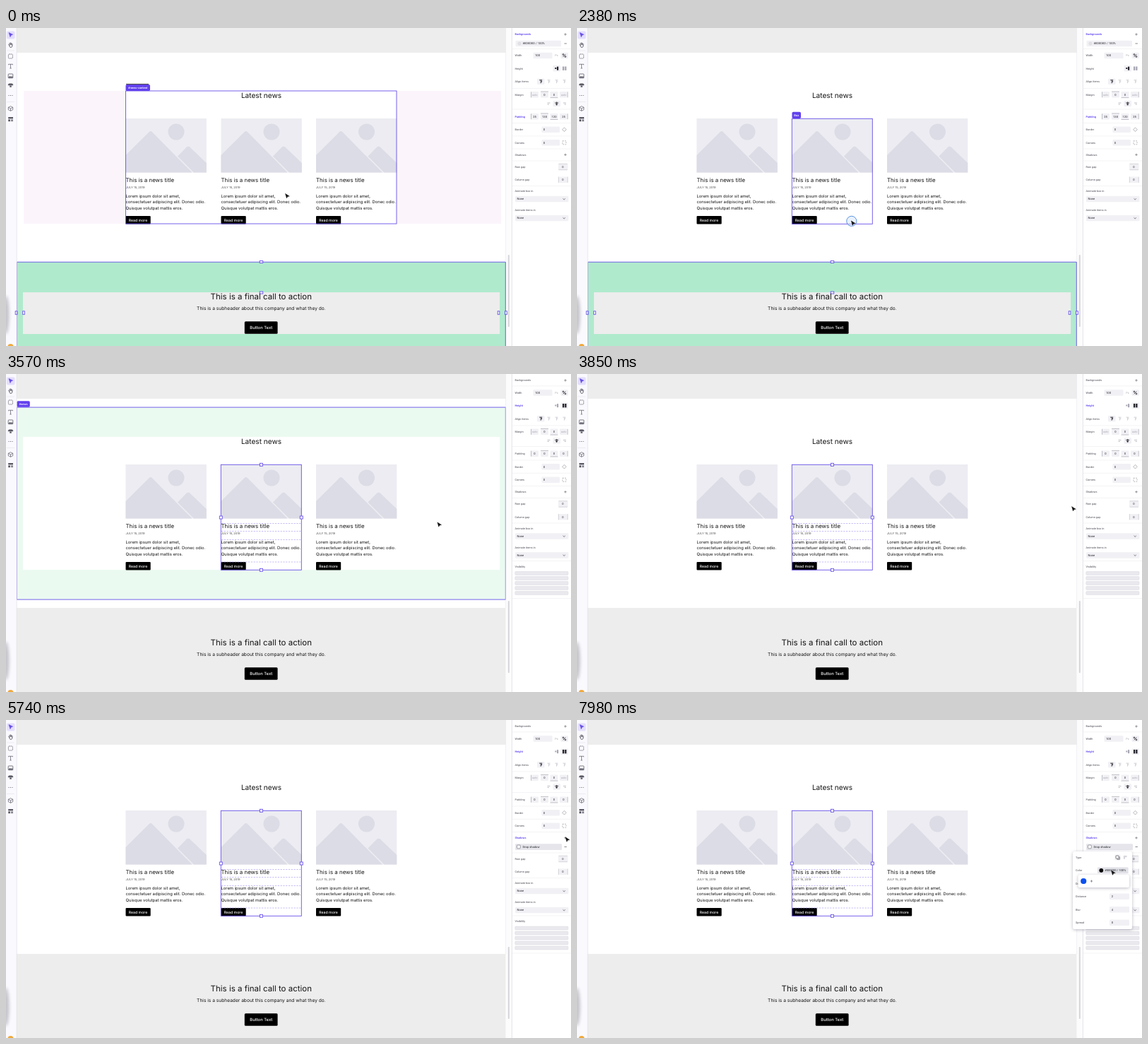
Write an HTML page that moves like this. It is 800 px wide and 450 px high and loops after 8000 ms.

```html
<!DOCTYPE html>
<html lang="en">
<head>
<meta charset="utf-8">
<title>Page builder</title>
<style>
  html, body { margin: 0; width: 100%; height: 100%; overflow: hidden; background: #fff; }
  svg { display: block; width: 100vw; height: 100vh; }
  text { font-family: Inter, "Open Sans", sans-serif; fill: #141414; text-rendering: geometricPrecision; }
  .ui text { font-family: Roboto, Inter, sans-serif; font-size: 3.9px; fill: #4c4c57; }
  .ui text.on { fill: #5a3df0; font-weight: 500; }
  .ui text.dim { fill: #a9a9b4; }
  .ui text.val { fill: #24242c; font-size: 4.1px; }
  text.tag { font-family: Roboto, Inter, sans-serif; font-size: 4.1px; font-weight: 500; fill: #fff; }
  .pop { filter: drop-shadow(0 1px 2px rgba(30, 30, 60, .3)); }
</style>
</head>
<body>
<svg id="stage" viewBox="0 0 800 450" preserveAspectRatio="none"></svg>
<script>
const LOOP = 8000;
const PURPLE = '#6750e8', FIELD = '#f1f1f5', BAND = '#ededed';

// Drawing helpers
const rect = (x, y, w, h, fill, more = '') =>
  `<rect x="${x}" y="${y}" width="${w}" height="${h}" fill="${fill}" ${more}/>`;
const text = (x, y, s, more = '') => `<text x="${x}" y="${y}" ${more}>${s}</text>`;
const path = (d, stroke, width = .7, fill = 'none') =>
  `<path d="${d}" stroke="${stroke}" stroke-width="${width}" fill="${fill}"/>`;
const size = (n, more = '') => `font-size="${n}" ${more}`;
const mid = 'text-anchor="middle"';
const outline = (x, y, w, h) => rect(x, y, w, h, 'none', `stroke="${PURPLE}" stroke-width=".9"`);
const handle = (x, y, w = 4, h = 4) =>
  rect(x - w / 2, y - h / 2, w, h, '#fff', `stroke="${PURPLE}" stroke-width=".9"`);
const tag = (x, y, w, h, s) =>
  rect(x, y, w, h, '#6140ee', 'rx="1.8"') + text(x + w / 2, y + h / 2 + 1.4, s, `class="tag" ${mid}`);
const group = (id, body) => `<g id="${id}">${body}</g>`;

// Page
function card(x) {
  const lines = ['Lorem ipsum dolor sit amet,', 'consectetuer adipiscing elit. Donec odio.',
    'Quisque volutpat mattis eros.'];
  return `<g transform="translate(${x} 0)">`
    + rect(0, 128, 114.3, 76.5, '#ececf2')
    + '<circle cx="71.5" cy="147" r="11.5" fill="#dcdce6"/>'
    + path('M0 180 L33 147.2 Q35.3 145 37.6 147.2 L94 204.5 H0 Z', 'none', 0, '#dcdce6')
    + path('M73.5 181.500 L86.5 168.3 Q88.5 166.5 90.5 168.3 L114.3 191 V204.5 H96.5 Z', 'none', 0, '#dcdce6')
    + text(0, 218.4, 'This is a news title', size(7.9))
    + text(0, 227, 'JULY 15, 2019', size(4.1, 'fill-opacity=".75"'))
    + lines.map((s, i) => text(0, 240 + i * 8.4, s, size(5.87))).join('')
    + rect(0, 265.9, 35.2, 11.7, '#000', 'rx="1"')
    + text(17.5, 273.6, 'Read more', size(5.2, `${mid} font-weight="500" style="fill:#fff"`))
    + '</g>';
}
const cards = [169.5, 304.5, 439].map(card).join('');

const ctaText = text(361.3, 383.6, 'This is a final call to action', size(11.5, mid))
  + text(361.4, 398.5, 'This is a subheader about this company and what they do.', size(6.63, mid))
  + rect(337.8, 415.2, 46.8, 17.6, '#000', 'rx="1.5"')
  + text(361.3, 426, 'Button Text', size(5.85, `${mid} font-weight="500" style="fill:#fff"`));

const ctaPick = rect(15, 331, 692.5, 119, '#b0eacd') + rect(24, 374, 675, 59, BAND)
  + path('M15.3 450 V331.2 H707.3 V450', PURPLE, .9)
  + handle(361.5, 331, 4.5, 3) + handle(361.5, 374.5, 4.5, 3)
  + [14.5, 25, 697.5, 708].map(x => handle(x, 403, 2.6, 4.6)).join('');

const cardPick = outline(304.3, 128.3, 114, 149)
  + path('M305 211.5 H418 M305 222.5 H418 M305 234.5 H418 M305 266 H418', '#9d8ff2', .6)
    .replace('/>', ' stroke-dasharray="2.2 1.6"/>')
  + handle(361.4, 128.3) + handle(361.4, 277.3) + handle(304.3, 203) + handle(418.3, 203);

// Tool strip
function tools() {
  const ink = '#5a5a65';
  return rect(0, 0, 15, 450, '#faf9fd') + path('M15.2 0 V450', '#e2e2e8', .8)
    + rect(1, 4.5, 11.5, 11, '#e4defc', 'rx="2"')
    + path('M4 6.6 L9.6 9.2 L7.2 10.2 L6 12.7 Z', PURPLE, .6, PURPLE)
    + path('M1 32 H12 M1 104.5 H12', '#e2e2e8', .6)
    + path('M4.5 24.5 L3.5 23 M5 25 V21 M6.3 24 V20.5 M7.6 24 V21 M8.9 24.5 V22 M4.5 24.5 Q5 27.6 7 27.6 Q9.3 27.2 8.9 24', ink, .9)
    + rect(3.4, 37, 6, 6, 'none', `stroke="${ink}" stroke-width=".8" stroke-dasharray="1.4 .7" rx="1"`)
    + path('M3.5 52.3 V51.3 H9.5 V52.3 M6.5 51.3 V57 M5.3 57 H7.7', ink, .7)
    + rect(3.2, 65, 6.6, 5.8, 'none', `stroke="${ink}" stroke-width=".8" rx=".8"`)
    + path('M3.5 70.3 L5.6 68 L7 69.4 L8.2 68.2 L9.6 70.3 Z', ink, .4, ink)
    + path('M3 81 Q3 78.7 5 78.7 H8 Q10 78.7 10 81 Z M5.5 81.8 H7.5 V83.5 H5.5 Z', ink, .5, ink)
    + [4, 6.5, 9].map(x => `<circle cx="${x}" cy="95.5" r=".6" fill="${ink}"/>`).join('')
    + path('M6.5 110.7 L9.7 112.3 V115.7 L6.5 117.3 L3.3 115.7 V112.3 Z M3.3 112.3 L6.5 114 L9.7 112.3 M6.5 114 V117.3', ink)
    + rect(3.2, 126, 6.8, 2.4, ink) + rect(3.2, 129.4, 2.8, 2.8, ink) + rect(7, 129.4, 3, 2.8, '#888892')
    + '<ellipse cx="0" cy="406" rx="4.5" ry="27" fill="#a8a8b2" opacity=".65" style="filter:blur(2px)"/>'
    + '<circle cx="6.5" cy="451" r="4" fill="#f0a93c"/>';
}

// Side panel
const plus = (x, y) => path(`M${x - 1.7} ${y} h3.4 M${x} ${y - 1.7} v3.4`, '#555560', .6);
const minus = y => path(`M790.5 ${y} h3.4`, '#555560', .7);
const label = (y, s, on) => text(720.5, y + 1.4, s, on ? 'class="on"' : '');
const value = (x, y, s, dim) => text(x, y + 1.4, s, `${mid} class="${dim ? 'dim' : 'val'}"`);
const field = (x, y, w, h = 8.5) => rect(x, y - h / 2, w, h, FIELD, 'rx="1.2"');
const rule = y => path(`M717 ${y} H800`, '#ececf0', .6);
const select = y => field(721, y, 75.5) + text(723.5, y + 1.4, 'None', 'class="val"')
  + path(`M788.5 ${y - .7} l1.7 1.6 l1.7 -1.6`, '#44444e', .7);

function alignIcon(x, y, on) {
  return path(`M${x - 2} ${y - 2} h4 M${x} ${y - 1.5} v4 M${x + 1.3} ${y - 1} v2`, on ? '#22222a' : '#b4b4be', on ? .9 : .6);
}
function sides(y, vals) {
  return [748.5, 762.5, 776, 789.5].map((x, i) => {
    const edge = ['M743.5 -4 V4', 'M757 -4.3 H768', 'M770.5 4.3 H781.5', 'M795.3 -4 V4'][i];
    return field(x - 5.5, y, 11) + `<g transform="translate(0 ${y})">${path(edge, '#9a9aa6', .6)}</g>`
      + value(x, y, vals[i], vals[i] === 'auto');
  }).join('');
}

function panel({ bg, shadow }) {
  let y = bg ? 12.5 : 0;
  let s = label(9, 'Backgrounds', bg) + plus(792, 9);
  if (bg) s += field(721.5, 22, 64.5)
    + '<circle cx="727" cy="22" r="2.2" fill="#e4e4e6" stroke="#d0d0d6" stroke-width=".4"/>'
    + text(731.5, 23.4, '#EDEDED / 100%', 'class="val"') + minus(22);
  s += rule(17 + y)
    + label(26.5 + y, 'Width') + field(746.5, 26.5 + y, 27) + value(752.5, 26.5 + y, '100')
    + value(779.5, 26.5 + y, 'Px', true) + field(785.5, 26.5 + y, 10.5)
    + path(`M788.7 ${28.3 + y} l3.6 -3.6`, '#22222a', .8)
    + [[789, 25], [792, 28]].map(p => `<circle cx="${p[0]}" cy="${p[1] + y}" r=".9" fill="none" stroke="#22222a" stroke-width=".8"/>`).join('')
    + label(44.7 + y, 'Height', !bg);
  const dark = on => on ? '#22222a' : '#a6a6b2';
  s += field(bg ? 774.5 : 785.5, 44.7 + y, 10.5)
    + rect(777.3, 43.5 + y, 2, 2, dark(bg)) + rect(780, 42.2 + y, 2.2, 5, dark(bg))
    + rect(788, 42 + y, 2.3, 5.4, dark(!bg)) + rect(791.2, 42 + y, 2.3, 5.4, dark(!bg))
    + label(63.2 + y, 'Align items') + field(752, 63.2 + y, 10.5)
    + [757.2, 768.5, 779.5, 790.5].map((x, i) => alignIcon(x, 63.2 + y, !i)).join('')
    + rule(73 + y)
    + label(81.8 + y, 'Margin') + sides(81.8 + y, ['auto', '0', '0', 'auto'])
    + field(774.5, 94.5 + y, 10.5)
    + path(`M766.5 ${93.5 + y} h4 M766.5 ${95.5 + y} h2.5 M789 ${93.5 + y} h4 M790.5 ${95.5 + y} h2.5`, '#a6a6b2', .7)
    + path(`M779.7 ${92 + y} v5 M777.3 ${93.5 + y} h4.8 M778.2 ${95.5 + y} h3`, '#22222a', .9)
    + rule(102.5 + y)
    + label(112.7 + y, 'Padding', bg)
    + sides(112.7 + y, bg ? ['25', '130', '120', '25'] : ['0', '0', '0', '0'])
    + rule(122 + y)
    + label(131.2 + y, 'Border') + field(758.5, 131.2 + y, 25.5) + value(761.8, 131.2 + y, '0')
    + path(`M790.5 ${128.4 + y} l2.8 2.8 l-2.8 2.8 l-2.8 -2.8 Z`, '#85858f', .6)
    + rule(140.3 + y)
    + label(149.7 + y, 'Corners') + field(758.5, 149.7 + y, 25.5) + value(761.8, 149.7 + y, '0')
    + rect(788, 147.3 + y, 5, 5, 'none', 'stroke="#85858f" stroke-width=".6" stroke-dasharray="1.8 1.4"')
    + rule(158.5 + y)
    + label(166.8 + y, 'Shadows', shadow) + plus(792, 166.8 + y);
  if (shadow) {
    s += rect(721, 175.2, 66, 8.8, '#e5e5eb', 'rx="1.2"')
      + rect(723.5, 177, 4.8, 4.8, '#fff', 'rx="1" stroke="#666672" stroke-width=".6"')
      + text(731.5, 181, 'Drop shadow', 'class="val"') + minus(179.5);
    y += 12.5;
  }
  s += rule(175.5 + y)
    + label(184 + y, 'Row gap') + field(782, 184 + y, 13.5) + value(788.5, 184 + y, '0')
    + path(`M782.5 ${179.8 + y} h12.5 M782.5 ${188.2 + y} h12.5`, '#b0b0bb', .5)
    + label(202.2 + y, 'Column gap') + field(782, 202.2 + y, 13.5) + value(788.5, 202.2 + y, '0')
    + path(`M782.3 ${198 + y} v8.4 M795.3 ${198 + y} v8.4`, '#b0b0bb', .5)
    + rule(211 + y)
    + label(218.2 + y, 'Animate box in') + select(229.5 + y)
    + label(245.5 + y, 'Animate items in') + select(256.5 + y);
  if (!bg) {
    s += rule(264.5 + y) + label(272.2 + y, 'Visibility');
    for (let i = 0; i < 5; i++)
      s += rect(720.8, 279.6 + i * 7 + y, 75.2, 4.8, '#e9e9ee', 'rx=".8" stroke="#d9d9e0" stroke-width=".5"');
    s += rule(317.5 + y);
  }
  return s;
}

const popRow = (y, s) => text(706, y + 1.4, s);
const shadowPop = rect(702, 186, 84, 110, '#fff', 'rx="2.5" class="pop"')
  + popRow(194.3, 'Type') + rect(761.5, 190.5, 8, 8, FIELD, 'rx="1"')
  + rect(763, 192, 4, 4, '#fff', 'stroke="#33333c" stroke-width=".6" rx=".6"')
  + path('M764.5 197.2 h3.8 v-3.8', '#33333c', .6)
  + path('M774.3 196.7 v-4.2 h4.2 M775.5 196.7 v-3 h3', '#b0b0ba', .6)
  + popRow(212.8, 'Color') + field(737, 212.8, 43.5)
  + group('colorHot', rect(737, 208.5, 43.5, 8.6, '#e2e2e9', 'rx="1.2"'))
  + '<circle cx="742.3" cy="212.8" r="2.9" fill="#000"/>'
  + text(747.2, 214.2, '#000000 / 100%', 'class="val"')
  + popRow(231.2, 'Direction') + field(742, 231.2, 25.5) + value(749, 231.2, '180°')
  + path('M776.5 229 v4.4 M775 232 l1.5 1.5 l1.5 -1.5', '#33333c', .7)
  + ['Distance', 'Blur', 'Spread'].map((s, i) => {
    const y = 249.7 + i * 18.5;
    return popRow(y, s) + field(754, y, 28) + value(758, y, '240'[i]);
  }).join('');

const colorPop = rect(709.5, 219, 72.5, 18, '#fff', 'rx="2.5" class="pop"')
  + '<circle cx="717.2" cy="228" r="4.1" fill="#0a4ff0"/>' + plus(728.5, 228);

const arrow = path('M-.6 -.2 L5.4 3.6 L2.9 4.1 L1.300 6.4 Z', '#111', .3, '#111');
const hand = path('M.5 .2 q.9 -.5 1.2 .5 l.6 2 l2 .5 q1 .4 .8 1.6 l-.5 2 h-3.3 l-2.3 -2.5 q-.2 -1 1 -.5 l.8 .5 Z', '#111', .7, '#fff');

const stage = document.getElementById('stage');
stage.innerHTML =
  rect(0, 0, 800, 450, '#fff') + rect(15, 0, 692.5, 35, BAND) + rect(15, 331, 692.5, 119, BAND)
  + group('ctaPick', ctaPick)
  + group('contentFill', rect(25, 89, 676, 188, '#fbf5fb') + rect(169.5, 89, 383.5, 188, '#fff'))
  + group('newsFill', rect(15.3, 47.1, 692, 272, '#ebfaf1') + rect(24, 89, 675, 188, '#fff'))
  + text(361.5, 98.5, 'Latest news', size(10.1, mid)) + cards + ctaText
  + group('contentHover', outline(169.5, 89, 383.5, 188)
    + path('M170 79.4 H202', '#222', .9) + tag(169.5, 80, 34.5, 9, '#news-content'))
  + group('newsHover', outline(15.3, 47.1, 692, 272) + tag(15.3, 38.3, 18.5, 8.4, '#news'))
  + group('boxHover', outline(304.3, 128.3, 114, 149) + tag(304.5, 118.7, 12.5, 9.4, 'Box'))
  + group('cardPick', cardPick)
  + group('textHover', outline(439.2, 234.3, 113.8, 25) + tag(439, 225, 14.5, 9, 'Text'))
  + path('M707.8 0 V331', '#e6e6ea', .7)
  + rect(708.2, 0, 8, 450, '#fcfcfd') + rect(710.8, 321, 2, 102, '#d5d5da', 'rx="1"')
  + tools()
  + group('ctaEdge', handle(14.5, 403, 2.6, 4.6) + handle(708, 403, 2.6, 4.6))
  + '<g class="ui">' + rect(716.3, 0, 84, 450, '#fff') + path('M716.4 0 V450', '#dedee5', .8)
  + group('plusHot', rect(787, 162.3, 10, 9, '#e6e6ec', 'rx="1.5"'))
  + group('panelPage', panel({ bg: true }))
  + group('panelCard', panel({}))
  + group('gapHot', label(184, 'Row gap', true))
  + group('panelShadow', panel({ shadow: true }))
  + group('shadowPop', shadowPop) + group('colorPop', colorPop) + '</g>'
  + '<circle id="ring" fill="#cfe2fb" fill-opacity=".45" stroke="#5b93de" stroke-width="1"/>'
  + group('pointer', group('arrow', arrow) + group('hand', hand));

const $ = id => document.getElementById(id);

// When each part is visible: [from, to) in ms
const PICK = 2450, ADD = 5250, POP = 6300, TINT = 7700;
const spans = {
  ctaPick: [0, PICK], ctaEdge: [0, PICK], cardPick: [PICK, LOOP],
  contentFill: [0, 420], contentHover: [0, 420], boxHover: [420, PICK],
  textHover: [2800, 3220], newsFill: [3220, 3780], newsHover: [3220, 3780],
  panelPage: [0, 2520], panelCard: [2520, ADD], panelShadow: [ADD, LOOP],
  gapHot: [2520, 3200], plusHot: [4500, ADD],
  shadowPop: [POP, LOOP], colorHot: [7350, LOOP], colorPop: [TINT, LOOP],
  arrow: [0, LOOP], hand: [4500, 5720]
};

// Pointer tip: time, x, y, eased on the way here
const route = [
  [0, 396, 234.5], [2150, 388.8, 273, 1], [2450, 388.8, 273], [3010, 492, 247.5],
  [3570, 611, 210], [4060, 768, 171], [4270, 768, 171], [4830, 794, 165, 1],
  [5670, 794, 165], [6100, 776, 179, 1], [6860, 776, 179], [7490, 757, 213, 1], [LOOP, 757, 213]
];
const clicks = [2200, 5130, 6220, 7530];
const RING = 380;

const clamp = k => Math.min(1, Math.max(0, k));
const smooth = k => k * k * (3 - 2 * k);

function tip(t) {
  const i = route.findIndex(p => p[0] > t);
  const a = route[i - 1], b = route[i];
  let k = (t - a[0]) / (b[0] - a[0]);
  if (b[3]) k = smooth(k);
  return [a[1] + (b[1] - a[1]) * k, a[2] + (b[2] - a[2]) * k];
}

function draw(t) {
  for (const id in spans)
    $(id).style.display = t >= spans[id][0] && t < spans[id][1] ? '' : 'none';
  if ($('hand').style.display === '') $('arrow').style.display = 'none';

  const [x, y] = tip(t);
  $('pointer').setAttribute('transform', `translate(${x} ${y})`);

  const start = clicks.find(c => t >= c && t < c + RING);
  const ring = $('ring');
  ring.style.display = start === undefined ? 'none' : '';
  if (start !== undefined) {
    const k = (t - start) / RING;
    ring.setAttribute('cx', x);
    ring.setAttribute('cy', y + .3);
    ring.setAttribute('r', 3.5 + 7.5 * k);
    ring.style.opacity = clamp((1 - k) / .15);
  }

  const open = clamp((t - POP) / 300);
  $('shadowPop').style.opacity = clamp(open * 2);
  $('shadowPop').setAttribute('transform', `translate(0 ${10 * (1 - open) ** 2})`);
  $('colorPop').style.opacity = clamp((t - TINT) / 140);
}

const born = performance.now();
function tick() {
  draw((performance.now() - born) % LOOP);
  requestAnimationFrame(tick);
}
tick();
</script>
</body>
</html>
```
